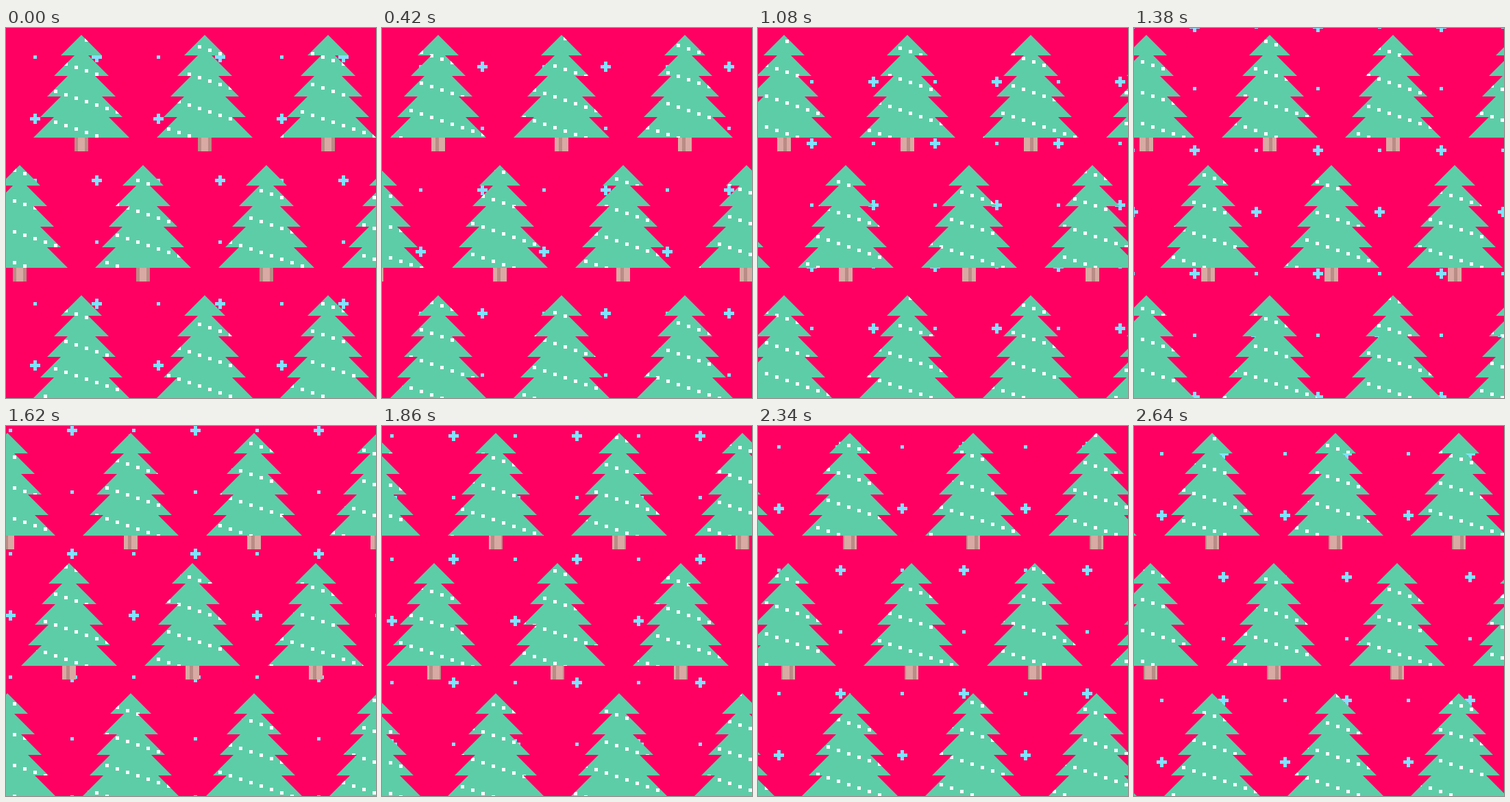
Animation, 540 px wide and 540 px high, one loop 2.7 s. Source, as an HTML page with a canvas:

```html
<!DOCTYPE html>
<html lang="en">
<head>
<meta charset="utf-8">
<title>Christmas trees</title>
<style>
  html, body { margin: 0; width: 100%; height: 100%; overflow: hidden; background: #ff0062; }
  canvas { display: block; }
</style>
</head>
<body>
<canvas id="stage" width="540" height="540"></canvas>
<script>
const SIZE = 540, STEP = 60, STEPS = 45;
const PITCH = 180, ROW = 190, UNIT = 5;
const COLOR = {
  sky: '#ff0062', snow: '#7fe3ff', leaf: '#5dcda8',
  wood: '#d9a9a3', bark: '#b98c85', light: '#fff'
};
const ctx = document.getElementById('stage').getContext('2d');

function rect(x, y, w, h, color) {
  ctx.fillStyle = color;
  ctx.fillRect(x, y, w, h);
}

// Checkerboard of dots and crosses drifting down and to the right.
function drawSnow(step) {
  for (let j = -2; j < 6; j++) {
    for (let i = -2; i < 6; i++) {
      const x = 40 + 90 * i + 2 * step;
      const y = 40 + 90 * j + 2 * step;
      rect(x, y, UNIT, UNIT, COLOR.snow);
      if ((i + j) % 2) {
        rect(x - UNIT, y, 3 * UNIT, UNIT, COLOR.snow);
        rect(x, y - UNIT, UNIT, 3 * UNIT, COLOR.snow);
      }
    }
  }
}

function treeTops(step) {
  const tops = [];
  for (let row = 0; row < 3; row++) {
    for (let col = -1; col < 5; col++) {
      tops.push([20 + 90 * ((row + 1) % 2) + PITCH * col - 4 * step, 10 + ROW * row]);
    }
  }
  return tops;
}

function drawTrunk(x, y, step) {
  const left = x - 10, top = y + 150;
  rect(left, top, 20, 20, COLOR.wood);
  for (let s = (3 * step) % 15 - 15; s < 20; s += 15) {
    const from = Math.max(s, 0), to = Math.min(s + UNIT, 20);
    if (to > from) rect(left + from, top, to - from, 20, COLOR.bark);
  }
}

function addTree(path, x, y) {
  const side = [];
  for (let tier = 0; tier < 5; tier++) {
    side.push([10 * tier, 30 * tier], [30 + 10 * tier, 30 * tier + 30]);
  }
  path.moveTo(x, y);
  side.forEach(([dx, dy]) => path.lineTo(x + dx, y + dy));
  side.reverse().forEach(([dx, dy]) => path.lineTo(x - dx, y + dy));
  path.closePath();
}

// Sloping strings of lights that rise, visible only on the trees.
function drawLights(trees, step) {
  ctx.save();
  ctx.clip(trees);
  for (let n = -1; n < 36; n++) {
    const first = (5 * n + 25 + 45) % 45 - 45 - step;
    for (let y = first; y < SIZE; y += 45) {
      rect(15 * n + 10, y, UNIT, UNIT, COLOR.light);
    }
  }
  ctx.restore();
}

function draw(step) {
  const tops = treeTops(step);
  const trees = new Path2D();
  rect(0, 0, SIZE, SIZE, COLOR.sky);
  drawSnow(step);
  for (const [x, y] of tops) {
    drawTrunk(x, y, step);
    addTree(trees, x, y);
  }
  ctx.fillStyle = COLOR.leaf;
  ctx.fill(trees);
  drawLights(trees, step);
}

const start = performance.now();
function tick() {
  draw(Math.floor((performance.now() - start) / STEP) % STEPS);
  requestAnimationFrame(tick);
}
tick();
</script>
</body>
</html>
```
